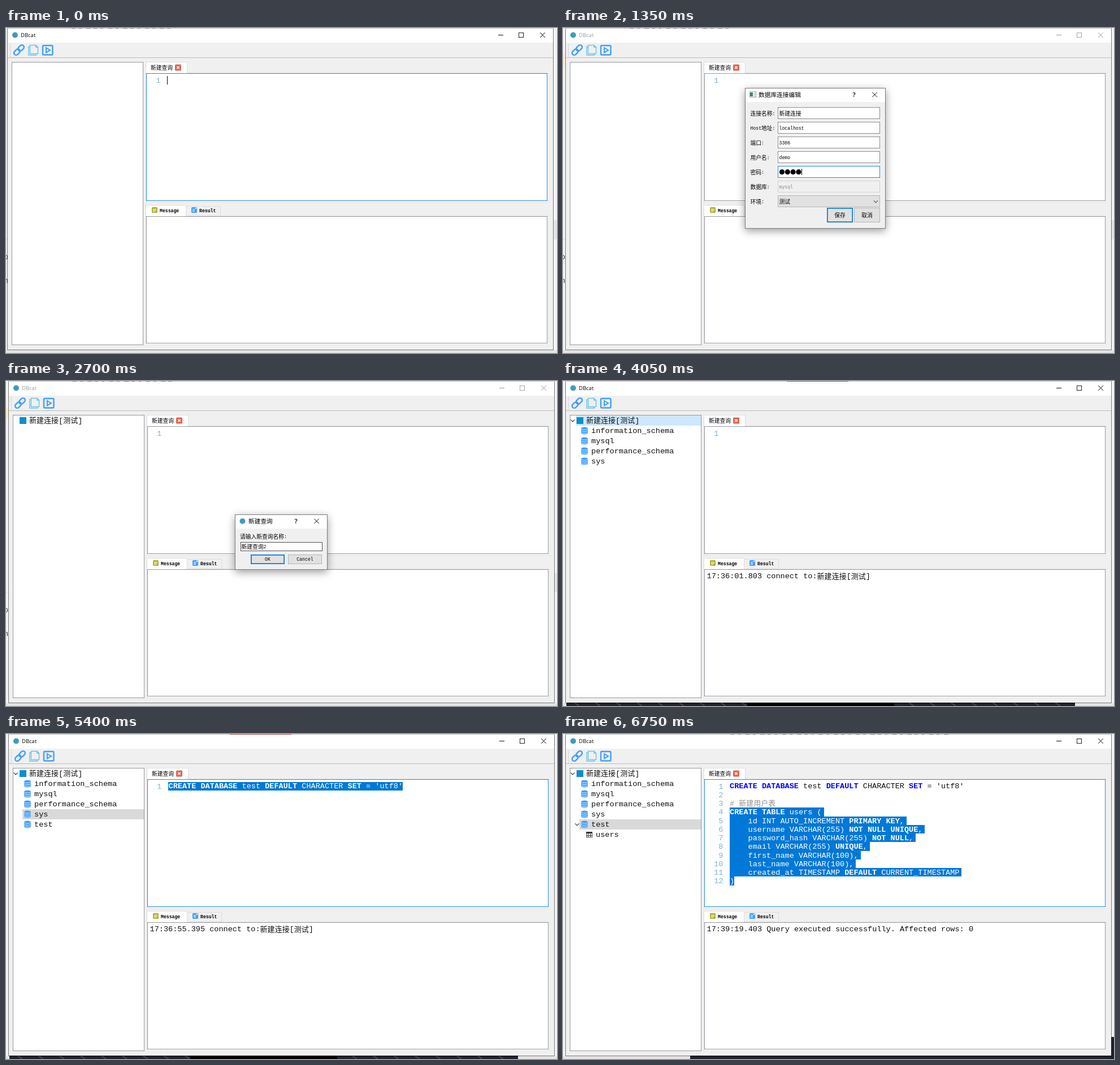
Animation of 975 by 575 pixels, one loop 8 s. Source, as an HTML page with a canvas:

```html
<!DOCTYPE html>
<html lang="zh-CN">
<head>
<meta charset="utf-8">
<style>
  html, body { margin: 0; width: 100%; height: 100%; overflow: hidden; background: #f0f0f0; }
  canvas { display: block; }
</style>
</head>
<body>
<canvas id="stage" width="975" height="575"></canvas>
<script>
const c = document.getElementById('stage').getContext('2d');
const LOOP = 8000, STEP = 1350;
const BLUE = '#0078d7', ICON = '#409eff', GREY = '#828790', FACE = '#f0f0f0', BUTTON = '#e1e1e1';
const CJK = '"Noto Sans CJK SC", "Noto Sans CJK", sans-serif';
const MONO = '"Liberation Mono", monospace';
const UI = '"Open Sans", sans-serif';
const CODE = 13.55, ROW = 15.27, HAIR = .85;

function rect(x, y, w, h, color) {
  c.fillStyle = color;
  c.fillRect(x, y, w, h);
}

function box(x, y, w, h, fill, border, width = HAIR) {
  rect(x, y, w, h, border);
  rect(x + width, y + width, w - 2 * width, h - 2 * width, fill);
}

function line(color, width, ...p) {
  c.strokeStyle = color;
  c.lineWidth = width;
  c.beginPath();
  for (let i = 0; i < p.length; i += 2) c.lineTo(p[i], p[i + 1]);
  c.stroke();
}

function round(x, y, w, h, r, fill, stroke, width = 1) {
  c.beginPath();
  c.roundRect(x, y, w, h, r);
  if (fill) { c.fillStyle = fill; c.fill(); }
  if (stroke) { c.strokeStyle = stroke; c.lineWidth = width; c.stroke(); }
}

function dot(x, y, r, color) {
  c.fillStyle = color;
  c.beginPath();
  c.arc(x, y, r, 0, 7);
  c.fill();
}

function cross(x, y, r, color, width = 1) {
  line(color, width, x - r, y - r, x + r, y + r);
  line(color, width, x - r, y + r, x + r, y - r);
}

function chevron(x, y, color = '#333') {
  line(color, 1.2, x - 3.5, y - 1.7, x, y + 1.8, x + 3.5, y - 1.7);
}

// Mixed Chinese and Latin text, vertically centred on y; returns the end x.
function text(str, x, y, color, { latin = CODE, han = 13.02, font = MONO, weight = '' } = {}) {
  c.fillStyle = color;
  for (const part of str.match(/[\u3400-\u9fff]+|[^\u3400-\u9fff]+/g)) {
    const isHan = part > '\u3400', size = isHan ? han : latin;
    c.font = `${weight} ${size}px ${isHan ? CJK : font}`;
    c.fillText(part, x, y + size * (isHan ? .36 : .33));
    x += c.measureText(part).width;
  }
  return x;
}

const small = (str, x, y, color = '#000', weight = '') =>
  text(str, x, y, color, { latin: 8.14, han: 9.77, weight });

const caption = (str, x, y, color = '#000') =>
  text(str, x, y, color, { latin: 9.5, han: 10.7, font: UI });

function button(label, x, y, w, h, primary) {
  box(x, y, w, h, BUTTON, primary ? BLUE : '#adadad', primary ? 1.7 : HAIR);
  c.textAlign = 'center';
  small(label, x + w / 2, y + h / 2);
  c.textAlign = 'left';
}

const KEYWORDS = /\b(CREATE|DATABASE|DEFAULT|SET|TABLE|PRIMARY|KEY|NOT|NULL|UNIQUE)\b/;

function codeLine(str, x, row, selected, newline = 0) {
  const y = 92 + row * ROW;
  c.font = `${CODE}px ${MONO}`;
  if (selected) {
    const top = Math.round(y - 7.5);
    rect(Math.floor(x), top, Math.round(c.measureText(str).width + newline), Math.round(y + ROW - 7.5) - top, BLUE);
  }
  if (str[0] === '#') return text(str, x, y, '#909090');
  for (const part of str.split(KEYWORDS)) {
    if (!part) continue;
    const key = KEYWORDS.test(part);
    x = text(part, x, y, selected ? '#fff' : key ? '#0000ff' : '#111', { weight: key ? 'bold' : '' });
  }
}

const TABLE_SQL = `CREATE TABLE users (
    id INT AUTO_INCREMENT PRIMARY KEY,
    username VARCHAR(255) NOT NULL UNIQUE,
    password_hash VARCHAR(255) NOT NULL,
    email VARCHAR(255) UNIQUE,
    first_name VARCHAR(100),
    last_name VARCHAR(100),
    created_at TIMESTAMP DEFAULT CURRENT_TIMESTAMP
)`.split('\n');
const DATABASE_SQL = "CREATE DATABASE test DEFAULT CHARACTER SET = 'utf8'";
const DATABASES = ['information_schema', 'mysql', 'performance_schema', 'sys', 'test'];

// What peeks out around the window edges.
function desktop(scene) {
  rect(0, 0, 975, 575, '#f4f4f4');
  rect(0, 570, 975, 5, '#e4e4e4');
  if (scene < 3) {
    rect(969, 340, 6, 34, '#e4e4e4');
    rect(0, 373, 5, 1, '#ddd');
    if (scene) rect(0, 47, 4, 19, '#fbeecb');
    text('o', -4, 405, '#333');
    text('n', -4, 447, '#333');
  } else if (scene < 5) {
    rect(6, 569, 900, 6, '#20212d');
    for (let x = 20; x < 900; x += 37) line('#454754', 2, x, 569, x + 9, 575);
    rect(326, 569, 260, 6, '#000');
  } else {
    rect(225, 569, 750, 6, '#20212d');
    rect(970, 536, 5, 39, '#20212d');
  }
}

function topEdge(scene) {
  rect(4, 0, 967, 1, '#c0c0c0');
  if (scene === 3 || scene === 4) return rect(396, 0, 109, 1, '#a04a4a');
  const [from, to] = scene === 5 ? [297, 685] : [118, 293];
  for (let x = from; x < to; x += 13) rect(x, 0, 4 + x % 5, 1, '#777');
}

function toolbar() {
  for (let y = 29; y < 51; y += 3) rect(9, y, 1, 1, '#a0a0a0');
  c.save();
  c.translate(25, 39);
  c.rotate(-Math.PI / 4);
  round(-11, -3.8, 12, 7.6, 3.8, null, ICON, 2.4);
  round(-1, -3.8, 12, 7.6, 3.8, null, ICON, 2.4);
  c.restore();
  line('#6cc3ea', 1.5, 44.5, 33, 42, 33, 42, 48, 55.5, 48, 55.5, 46);
  line('#6cc3ea', 1.5, 55, 30.5, 44.5, 30.5, 44.5, 45.5, 58.5, 45.5, 58.5, 34, 55, 30.5, 55, 34, 58.5, 34);
  round(67, 31, 17.5, 16.5, 1.5, null, ICON, 2.4);
  c.beginPath();
  c.moveTo(73, 35); c.lineTo(80, 39.2); c.lineTo(73, 43.5); c.closePath();
  c.lineWidth = 2;
  c.stroke();
}

function cylinder(x, y) {
  round(x, y - 6.5, 12, 13, { x: 6, y: 2.3 }, ICON);
  c.strokeStyle = '#fff';
  c.lineWidth = .8;
  for (const dy of [-4, -.7, 2.6]) {
    c.beginPath();
    c.ellipse(x + 6, y + dy, 6.2, 2.2, 0, 0, Math.PI);
    c.stroke();
  }
}

function tree(scene) {
  box(12, 60, 233, 501, '#fff', GREY);
  if (scene < 2) return;
  if (scene === 3) rect(23, 61, 221, 18, '#cde8ff');
  if (scene > 3) rect(29, scene === 4 ? 133 : 151, 215, 18, '#d9d9d9');
  rect(24, 64, 12, 12, '#0d8ecf');
  text('新建连接[测试]', 41, 69.7, '#111');
  if (scene < 3) return;
  chevron(17, 70);
  DATABASES.slice(0, scene === 3 ? 4 : 5).forEach((name, i) => {
    cylinder(32, 88 + i * 18);
    text(name, 50, 88 + i * 18, '#111');
  });
  if (scene < 5) return;
  chevron(25, 160);
  box(41, 173, 11, 10, '#fff', '#333');
  rect(41, 173, 11, 2, '#333');
  for (const d of [3, 7]) {
    rect(41 + d, 173, 1, 10, '#333');
    rect(41, 173 + d - 1, 11, 1, '#333');
  }
  text('users', 58, 177.5, '#111');
}

function editor(scene) {
  box(249, 79, 713, 230, '#f8f8f8', '#e2e2e2');
  box(249, 60, 74, 21, '#fff', '#d9d9d9');
  rect(250, 79, 72, 3, '#fff');
  small('新建查询', 258, 70);
  round(301, 64.5, 11, 11, 1.5, '#e0644e');
  cross(306.5, 70, 2.3, '#fff', 1.5);
  const focused = scene === 0 || scene > 3;
  box(250, 80, 710, 226, '#fff', focused ? BLUE : GREY);

  const lines = scene === 5 ? 12 : 1;
  c.textAlign = 'right';
  for (let i = 0; i < lines; i++) {
    c.font = `${CODE}px ${MONO}`;
    c.fillStyle = '#7fb3d0';
    c.fillText(i + 1, lines > 1 ? 283.5 : 275.5, 96.5 + i * ROW);
  }
  c.textAlign = 'left';
  if (scene === 0) rect(287, 85, 1, 15, '#000');
  if (scene === 4) codeLine(DATABASE_SQL, 287.5, 0, true);
  if (scene === 5) {
    codeLine(DATABASE_SQL, 295, 0);
    codeLine('# 新建用户表', 295, 2);
    TABLE_SQL.forEach((str, i) => codeLine(str, 295, i + 3, true, i < 8 ? 4 : 0));
  }
}

function messages(scene) {
  box(249, 332, 713, 229, '#f8f8f8', '#e2e2e2');
  box(320, 315, 62, 18, FACE, '#d9d9d9');
  box(249, 313, 72, 21, '#fff', '#d9d9d9');
  round(260, 317, 10, 10, 1.5, '#b0b12c');
  for (const y of [320, 322, 324]) rect(262, y, y < 324 ? 6 : 4, 1, '#fff');
  round(330, 317, 10, 10, 1.5, ICON);
  for (const y of [320, 322, 324]) rect(332, y, 4, 1, '#fff');
  rect(337, 318, 2, 2, '#fff');
  small('Message', 274, 323, '#000', 'bold');
  small('Result', 344, 323.5, '#000', 'bold');
  box(250, 333, 710, 225, '#fff', GREY);
  const log = {
    3: '17:36:01.803 connect to:新建连接[测试]',
    4: '17:36:55.395 connect to:新建连接[测试]',
    5: '17:39:19.403 Query executed successfully. Affected rows: 0'
  }[scene];
  if (log) text(log, 254.5, 345, '#111');
}

function mainWindow(scene) {
  const active = scene === 0 || scene > 2, ink = active ? '#000' : '#999';
  rect(4, 0, 967, 570, 'rgba(0, 0, 0, .5)');
  rect(5, 1, 965, 568, FACE);
  rect(5, 1, 965, 25, '#fff');
  topEdge(scene);
  dot(18, 12.5, 5, '#3c9dbd');
  caption('DBcat', 28, 13, ink);
  rect(873, 12, 9, 1, ink);
  box(909, 8, 9, 9, '#fff', ink);
  cross(951.5, 12.5, 4.3, ink);
  rect(5, 52, 965, 1, '#bcbcbc');
  toolbar();
  tree(scene);
  editor(scene);
  messages(scene);
}

function dialog(title, x, y, w, h, titleX, helpX, closeX) {
  c.save();
  c.shadowColor = 'rgba(0,0,0,.4)';
  c.shadowBlur = 14;
  c.shadowOffsetY = 4;
  rect(x, y, w, h, '#777');
  c.restore();
  box(x, y, w, h, FACE, '#666');
  rect(x + 1, y + 1, w - 2, 24, '#fff');
  caption(title, titleX, y + 12);
  text('?', helpX - 2.5, y + 12, '#000', { latin: 11.5, font: UI, weight: '600' });
  cross(closeX, y + 12, 4.2, '#000');
}

function connectionDialog() {
  dialog('数据库连接编辑', 322, 106, 249, 249, 346, 515, 551.5);
  box(330, 112, 12, 11, '#fff', '#8a9aa5');
  rect(331, 114, 5, 7, '#3f8577');
  rect(337, 114, 4, 8, '#dce4ea');
  const fields = [
    ['连接名称:', '新建连接'], ['Host地址:', 'localhost'], ['端口:', '3306'],
    ['用户名:', 'demo'], ['密码:', ''], ['数据库:', 'mysql'], ['环境:', '测试']
  ];
  fields.forEach(([label, value], i) => {
    const y = 140 + i * 26, off = i === 5, combo = i === 6;
    small(label, 331.5, y + 11);
    box(380, y, 181, 21, off ? FACE : combo ? BUTTON : '#fff',
      i === 4 ? BLUE : off ? '#ccc' : combo ? '#adadad' : '#7a7a7a');
    if (value) small(value, 382.5, y + 11, off ? '#888' : '#000');
  });
  for (let i = 0; i < 4; i++) dot(387.5 + i * 9.8, 254.7, 4.6, '#000');
  rect(422, 249, 1, 11, '#000');
  chevron(553.5, 307, '#555');
  button('保存', 467, 318, 46, 26, true);
  button('取消', 515, 318, 46, 26);
}

function queryDialog() {
  dialog('新建查询', 405, 236, 164, 98, 429, 513, 549.5);
  dot(418.5, 248, 5, '#3c9dbd');
  small('请输入新查询名称:', 414, 275);
  box(415, 285, 145, 16, '#fff', '#333');
  small('新建查询2', 416.5, 293);
  button('OK', 433, 307, 60, 17, true);
  button('Cancel', 499, 307, 60, 17);
}

function draw(scene) {
  desktop(scene);
  c.save();
  if (scene === 0) c.translate(-2, 0);
  mainWindow(scene);
  c.restore();
  if (scene === 1) connectionDialog();
  if (scene === 2) queryDialog();
}

let shown = -1;
function tick() {
  const scene = Math.floor(performance.now() % LOOP / STEP);
  if (scene !== shown) draw(shown = scene);
  requestAnimationFrame(tick);
}
tick();
</script>
</body>
</html>
```
